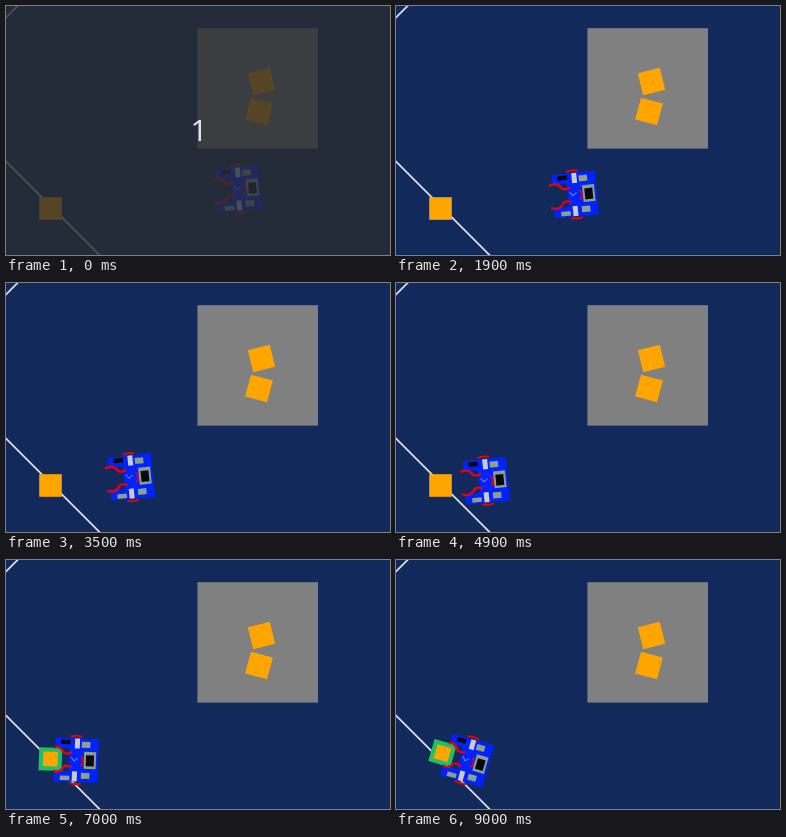
These frames come from a looping animation (384 by 249 pixels, 9.1 s). An HTML page with a canvas:

```html
<!DOCTYPE html>
<html lang="en">
<head>
<meta charset="utf-8">
<title>Robot run</title>
<style>
  html, body { margin: 0; width: 100%; height: 100%; overflow: hidden; background: #11295b; }
  canvas { display: block; }
</style>
</head>
<body>
<canvas id="stage" width="384" height="249"></canvas>
<script>
const ctx = document.getElementById('stage').getContext('2d');
const LOOP = 9100, STEP = 100, GRIP = 6000, TURN = 6300, STOP = 9000;
const FLOOR = '#11295b', ORANGE = '#ffa500', BLUE = '#0022ff', RED = '#e60012';
const DARK = '#060a10', METAL = '#c8ccd2', SENSOR = '#8ca08c';
const SPEEDS = [37, 18.5, 33.5, 37, 18.5, 18.5]; // pixels in each second
const SIDES = [-1, 1];

const clamp = value => Math.max(0, Math.min(1, value));

// A straight drive at a gentle slope, then an easing turn on the spot.
function poseAt(t) {
  const travelled = SPEEDS.reduce((sum, speed, i) => sum + speed * clamp(t / 1000 - i), 0);
  const turn = clamp((t - TURN) / (STOP - TURN));
  return {
    x: 231.5 - travelled + 1.5 * turn,
    y: 183 + travelled * 0.104,
    angle: -6 + 22 * turn ** 0.75
  };
}

function rect(color, x, y, w, h) {
  ctx.fillStyle = color;
  ctx.fillRect(x, y, w, h);
}

function square(color, x, y, size) {
  rect(color, x - size / 2, y - size / 2, size, size);
}

function stroke(color, width, path) {
  ctx.strokeStyle = color;
  ctx.lineWidth = width;
  ctx.beginPath();
  path();
  ctx.stroke();
}

// Border line falling to the right (slope 1) or rising (slope -1).
function border(y, slope) {
  stroke('#dcdfe6', 1.8, () => {
    ctx.moveTo(-9, y - 9 * slope);
    ctx.lineTo(120, y + 120 * slope);
  });
}

function placed(x, y, degrees, draw) {
  ctx.save();
  ctx.translate(x, y);
  ctx.rotate(degrees * Math.PI / 180);
  draw();
  ctx.restore();
}

function block(x, y, degrees = 0) {
  placed(x, y, degrees, () => square(ORANGE, 0, 0, 22.6));
}

function heldBlock() {
  square('#20c060', -24.5, 0, 23);
  square(ORANGE, -24.5, 0, 14.5);
}

function claw(side, reach) {
  stroke(RED, 2.3, () => {
    ctx.moveTo(-reach, side * 11);
    ctx.bezierCurveTo(-18, side * 14, -14, side * 12, -11, side * 7);
    ctx.quadraticCurveTo(-8, side * 5, -3, side * 7.5);
  });
}

// One motor pod; both sides share the layout, slightly staggered.
function pod(side) {
  const mid = side * 16.5, shift = -side;
  rect(BLUE, -20.5 + shift / 2, mid - 5, 43, 10);
  rect(METAL, -1.5 + shift, mid - 5, 5, 10);
  rect(SENSOR, 6.5, mid - 3 + shift, 8.5, 6);
  rect(side < 0 ? DARK : SENSOR, -14.5, mid - 2 + side * 1.5, 9.5, 4.5);
  stroke(RED, 2, () => {
    ctx.moveTo(-5, side * 23.3);
    ctx.quadraticCurveTo(1, side * 25, 6.5, side * 23.3);
  });
}

function robot(held) {
  rect(BLUE, 6, -21.5, 17, 43.5);
  rect(BLUE, -6, -12, 13, 24);
  SIDES.forEach(pod);

  rect(SENSOR, 9, -8.5, 12, 17);
  rect(DARK, 11, -5, 8, 11);
  stroke(RED, 1.8, () => ctx.arc(1, 1, 7, -0.8, 0.8));
  stroke('#7088b8', 1, () => {
    ctx.moveTo(-4, -3);
    ctx.lineTo(-1, 1);
    ctx.lineTo(3, -2);
  });
  SIDES.forEach(side => claw(side, held ? 21 : 24));
}

function countdown() {
  rect('rgba(41, 44, 48, 0.79)', 0, 0, 384, 249);
  ctx.fillStyle = '#e4e7eb';
  ctx.font = '30px "Open Sans", sans-serif';
  ctx.textAlign = 'center';
  ctx.fillText('1', 193, 135);
}

function draw(t) {
  const held = t >= GRIP;
  rect(FLOOR, 0, 0, 384, 249);
  border(11.5, -1);
  border(155.5, 1);
  rect('#808080', 191.4, 22.2, 120.6, 120.4);
  block(255.5, 75.5, -14);
  block(253, 105.5, 15);
  if (!held) block(44.5, 202.5);

  const { x, y, angle } = poseAt(t);
  placed(x, y, angle, () => {
    if (held) heldBlock();
    robot(held);
  });
  if (t < STEP) countdown();
}

const start = performance.now();
function tick() {
  const elapsed = (performance.now() - start) % LOOP;
  draw(Math.floor(elapsed / STEP) * STEP);
  requestAnimationFrame(tick);
}
tick();
</script>
</body>
</html>
```
